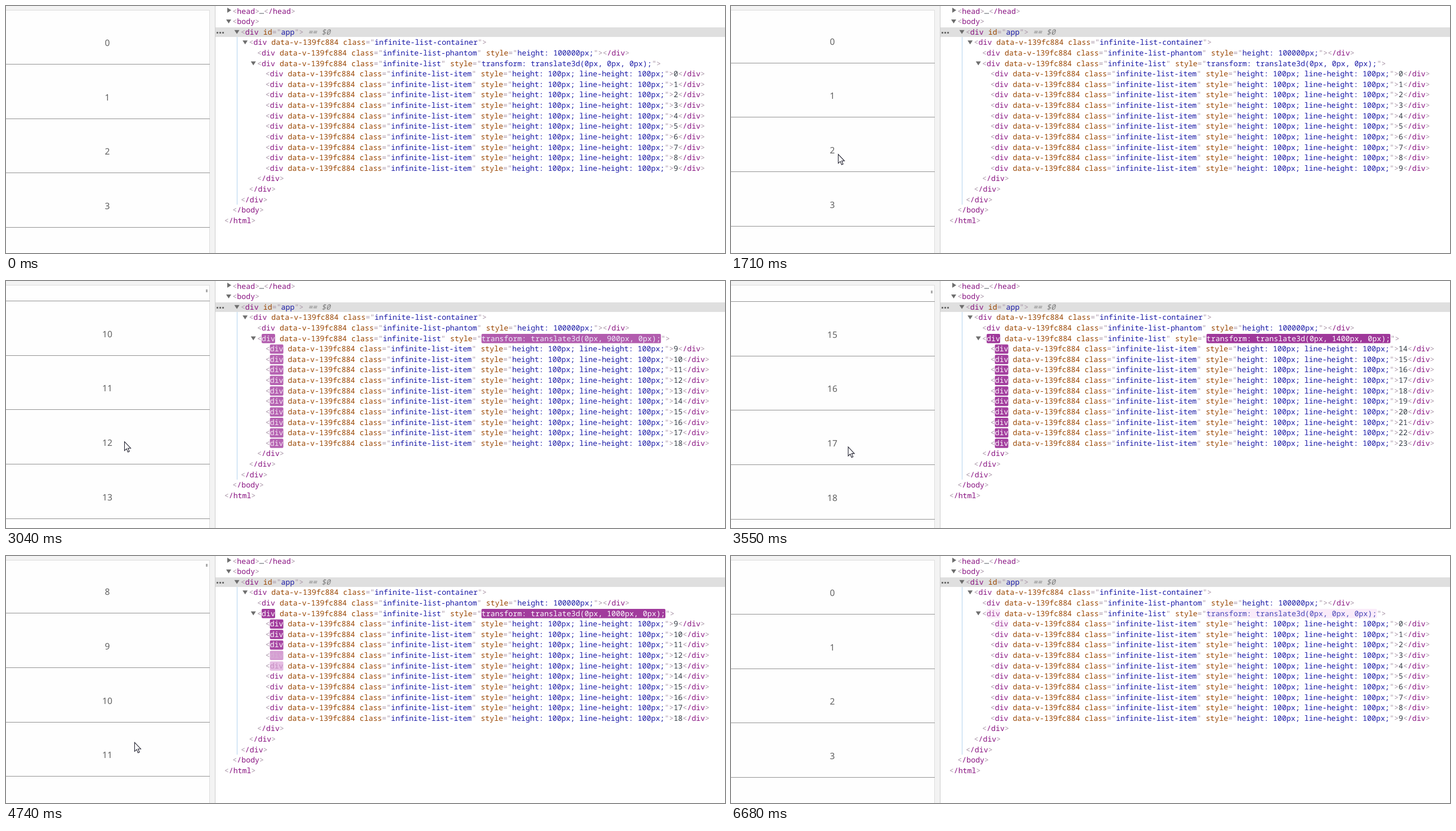
Write an HTML page with a canvas that moves like this. It is 1277 px wide and 439 px high and loops after 6780 ms.

```html
<!DOCTYPE html>
<html lang="en">
<head>
<meta charset="utf-8">
<title>Virtual list</title>
<style>
  html, body { margin: 0; width: 100%; height: 100%; overflow: hidden; background: #fff; }
  canvas { display: block; }
</style>
</head>
<body>
<canvas id="stage" width="1277" height="439"></canvas>
<script>
const LOOP = 6780;
const ctx = document.getElementById('stage').getContext('2d');

// Elements panel
const CHAR = 7.968, ROW = 18.62, INDENT = 14.6;
const MONO = '13.28px "Noto Sans Mono", "DejaVu Sans Mono", monospace';
const PUNCT = [168, 148, 166], NAME = [136, 18, 128], ATTR = [153, 69, 0],
      VALUE = [26, 26, 166], PLAIN = [48, 57, 66], GREY = [125, 125, 125];
const HOT = [158, 54, 153], WARM = [245, 219, 244], WHITE = [255, 255, 255];
const WARM_AGE = 900, COLD_AGE = 1180;

// Page list, and how late each view follows the scroll offset
const ITEM = 96.65, PAGE_LAG = 50, ROW_LAG = 90, STYLE_LAG = 130;

// Evenly spaced swipes, each easing out to the next stop
const SWIPE_START = 1710, SWIPE_EVERY = 704, SWIPE_TIME = 645;
const STOPS = [0, 529, 938, 1438, 1207, 593, 0];

const POINTER = [
  { t: 0, x: 180, y: 441 },
  { t: 560, x: 199, y: 201 },
  { t: 960, x: 199, y: 201 },
  { t: 1050, x: 190, y: 263 },
  { t: 1710, x: 190, y: 263 },
  { t: 2350, x: 176, y: 298 },
  { t: 3040, x: 210, y: 285 },
  { t: 4120, x: 205, y: 305 },
  { t: 5420, x: 253, y: 359 },
  { t: 5750, x: 275, y: 441 }
];

const clamp = v => Math.min(1, Math.max(0, v));
const lerp = (a, b, k) => a + (b - a) * k;
const mix = (a, b, k) => a.map((v, i) => lerp(v, b[i], k));
const rgb = c => `rgb(${c.map(Math.round)})`;
const easeOut = k => 1 - (1 - k) ** 3;

function scrollAt(t) {
  const swipe = Math.floor((t - SWIPE_START) / SWIPE_EVERY);
  if (swipe < 0 || swipe >= STOPS.length - 1) return 0;
  const k = clamp((t - SWIPE_START - swipe * SWIPE_EVERY) / SWIPE_TIME);
  return lerp(STOPS[swipe], STOPS[swipe + 1], easeOut(k));
}

const firstAt = t => Math.floor(scrollAt(t) / ITEM);

// Replays list updates up to t to learn when each row last changed
function panelState(t) {
  let first = 0, offset = 0, offsetTime = -1e4;
  let stamps = Array(10).fill(-1e4);
  for (let s = 0; s <= t; s += 5) {
    const next = firstAt(s - ROW_LAG);
    if (next > first) stamps.fill(s);
    for (let n = first; n > next; n--) stamps = [s, ...stamps.slice(0, 9)];
    first = next;
    const moved = firstAt(s - STYLE_LAG);
    if (moved !== offset) offsetTime = s;
    offset = moved;
  }
  return { first, offset, offsetAge: t - offsetTime, ages: stamps.map(s => t - s) };
}

function rect(color, x, y, w, h) {
  ctx.fillStyle = color;
  ctx.fillRect(x, y, w, h);
}

function shape(points, x, y, fill) {
  ctx.beginPath();
  points.forEach(([dx, dy]) => ctx.lineTo(x + dx, y + dy));
  ctx.closePath();
  ctx.fillStyle = fill;
  ctx.fill();
}

// Writing position in the elements panel
let penX, penY;

function line(row, depth) {
  penX = 387.7 + INDENT * depth;
  penY = 13.5 + ROW * row;
}

function foldedMark() {
  shape([[0, 0], [7, 4.5], [0, 9]], penX - 9.3, penY - 10.5, '#6e6e6e');
}

function openMark() {
  shape([[0, 0], [9, 0], [4.5, 7]], penX - 11.3, penY - 8, '#6e6e6e');
}

function put(text, color) {
  ctx.fillStyle = rgb(color);
  ctx.fillText(text, penX, penY);
  penX += text.length * CHAR;
}

// Text with an update highlight that fades with age
function putHot(text, color, age = COLD_AGE) {
  if (age < COLD_AGE) {
    const warm = mix(HOT, WARM, clamp(age / WARM_AGE));
    const back = mix(warm, WHITE, clamp((age - WARM_AGE) / (COLD_AGE - WARM_AGE)));
    ctx.fillStyle = rgb(back);
    ctx.beginPath();
    ctx.roundRect(penX, penY - 12.5, text.length * CHAR, 16.5, 2);
    ctx.fill();
    color = mix(WHITE, color, (age / COLD_AGE) ** 1.5);
  }
  put(text, color);
}

function attr(name, value, age) {
  put(' ' + name, ATTR);
  put('="', PUNCT);
  putHot(value, VALUE, age);
  put('"', PUNCT);
}

function tag(name, age) {
  put('<', PUNCT);
  putHot(name, NAME, age);
}

const endTag = () => put('>', PUNCT);

function whole(name) {
  tag(name);
  endTag();
}

function listDiv(kind, style, age, styleAge) {
  tag('div', age);
  put(' data-v-139fc884', ATTR);
  attr('class', 'infinite-list' + kind);
  if (style) attr('style', style, styleAge);
  endTag();
}

function drawPanel(t) {
  const { first, offset, offsetAge, ages } = panelState(t);
  rect('#fff', 372, 0, 905, 439);
  rect('#dfdfdf', 372, 38, 905, 17);
  rect('#cdcdcd', 371, 0, 1, 439);
  rect('#b3d3ee', 410, 55, 1, 298);
  for (let i = 0; i < 3; i++) rect('#6e6e6e', 374 + i * 5, 46, 3, 3);

  ctx.font = MONO;
  ctx.textAlign = 'left';
  line(0, 1);
  foldedMark();
  whole('head');
  put('…', PLAIN);
  whole('/head');

  line(1, 1);
  openMark();
  whole('body');

  line(2, 2);
  openMark();
  tag('div');
  attr('id', 'app');
  endTag();
  ctx.font = 'italic ' + MONO;
  put(' == $0', GREY);
  ctx.font = MONO;

  line(3, 3);
  openMark();
  listDiv('-container');

  line(4, 4);
  listDiv('-phantom', 'height: 100000px;');
  whole('/div');

  line(5, 4);
  openMark();
  listDiv('', `transform: translate3d(0px, ${offset * 100}px, 0px);`, offsetAge, offsetAge);

  ages.forEach((age, i) => {
    line(6 + i, 5);
    listDiv('-item', 'height: 100px; line-height: 100px;', age);
    put(String(first + i), PLAIN);
    whole('/div');
  });

  ['/div', '/div', '/div', '/body', '/html'].forEach((name, i) => {
    line(16 + i, 4 - i);
    whole(name);
  });
}

function drawList(t) {
  const scroll = scrollAt(t), first = firstAt(t - PAGE_LAG);
  rect('#f3f3f3', 0, 0, 371, 439);
  rect('#dcdcdc', 0, 7, 362, 432);
  rect('#fefefe', 0, 8, 361, 431);

  ctx.save();
  ctx.beginPath();
  ctx.rect(0, 8, 362, 431);
  ctx.clip();
  ctx.font = '15.6px "Noto Sans", "Open Sans", sans-serif';
  ctx.textAlign = 'center';
  for (let n = first; n < first + 10; n++) {
    const bottom = Math.floor(103.6 + ITEM * n - scroll);
    rect('#929292', 0, bottom, 362, 1);
    ctx.fillStyle = '#606060';
    ctx.fillText(n, 180, bottom - 32);
  }
  if (t > SWIPE_START + 10 && t < 6050) {
    rect('#aaa', 355, Math.floor(11.5 + scroll * 0.0045), 3, 5);
  }
  ctx.restore();
}

function drawPointer(t) {
  const i = POINTER.findIndex(p => p.t > t);
  if (i < 0) return;
  const a = POINTER[i - 1], b = POINTER[i];
  const k = (t - a.t) / (b.t - a.t);
  const arrow = [[0, 0], [0, 16], [3.6, 12.6], [6, 18.5], [8.6, 17.4], [6.2, 11.7], [11, 11.7]];
  shape(arrow, lerp(a.x, b.x, k) + 0.5, lerp(a.y, b.y, k) + 0.5, '#fff');
  ctx.lineWidth = 1.1;
  ctx.strokeStyle = '#222230';
  ctx.stroke();
}

function frame(now) {
  const t = now % LOOP;
  ctx.textRendering = 'geometricPrecision';
  drawList(t);
  drawPanel(t);
  drawPointer(t);
  requestAnimationFrame(frame);
}
requestAnimationFrame(frame);
</script>
</body>
</html>
```
